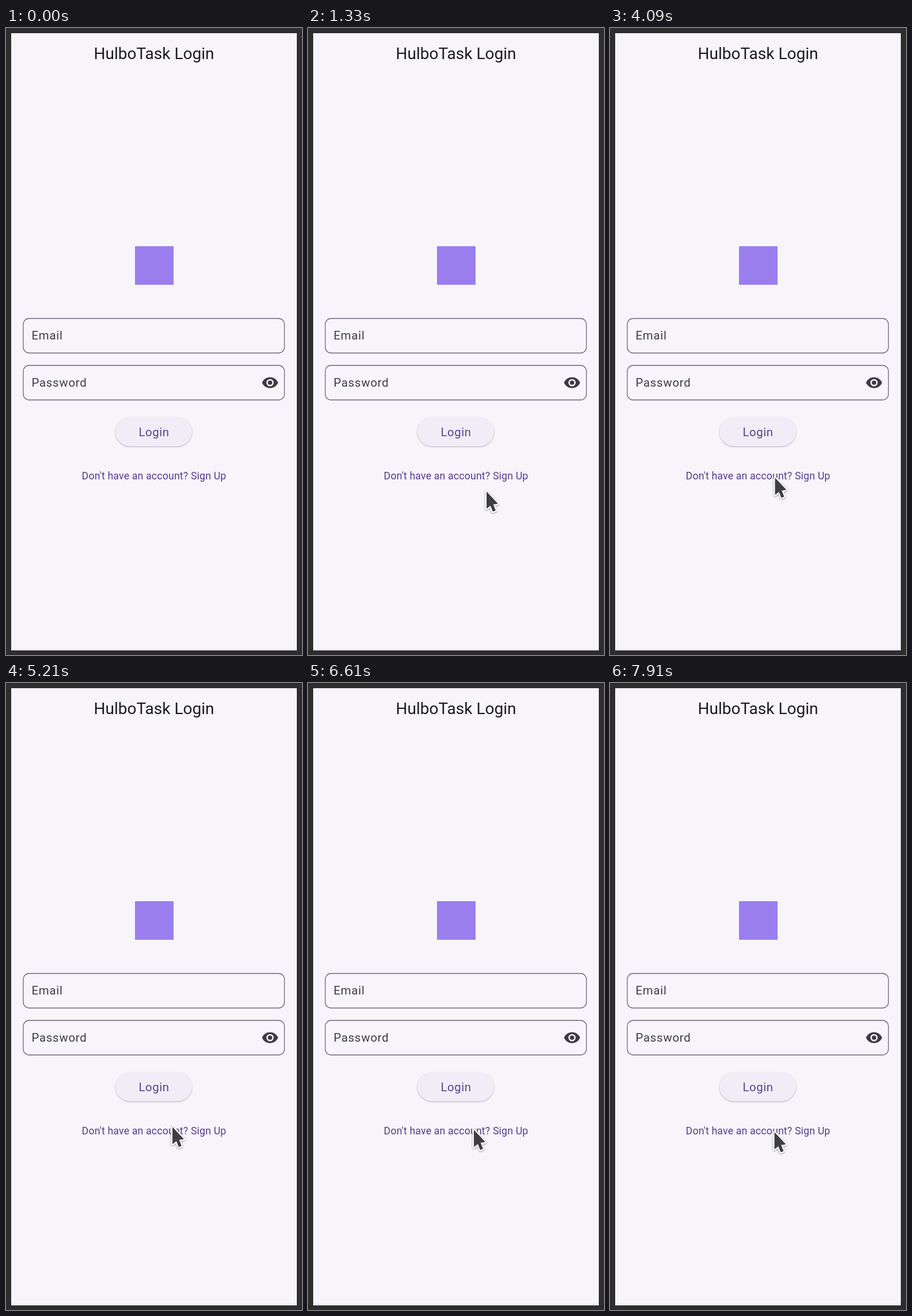
An HTML page that plays this animation: 514 px wide and 1089 px high, repeating every 8 s.

```html
<!DOCTYPE html>
<html lang="en">
<head>
<meta charset="utf-8">
<title>Login</title>
<style>
  html, body { margin: 0; width: 100%; height: 100%; overflow: hidden; background: #2d2d2e; }
  svg { display: block; width: 514px; height: 1089px; }
  text { font-family: Roboto, sans-serif; }
  .title { font-size: 28px; fill: #1d1b20; }
  .label { font-size: 20.4px; letter-spacing: .75px; fill: #403c46; }
  .action { font-size: 20.3px; letter-spacing: .6px; fill: #56438e; }
  .link { font-size: 17.8px; letter-spacing: .13px; fill: #543f8d; }
  .mid { text-anchor: middle; }
  .field { fill: none; stroke: #6c6777; stroke-width: 1.3; }
  .button { fill: #f1edf6; filter: drop-shadow(0 1px 1px rgba(40, 30, 60, .32)); }
  #cursor { filter: drop-shadow(0 1px 1.5px rgba(0, 0, 0, .4)); }
</style>
</head>
<body>
<svg viewBox="0 0 514 1089">
  <rect width="514" height="1089" fill="#2d2d2e"/>
  <rect x="9" y="9" width="496" height="1072" fill="#f7f4fa"/>
  <text class="title mid" x="257" y="54">HulboTask Login</text>
  <rect x="224" y="379" width="67" height="67" fill="#9b7eee"/>

  <rect class="field" x="30" y="504.5" width="453.5" height="60" rx="10"/>
  <text class="label" x="44.5" y="541">Email</text>
  <rect class="field" x="30" y="586" width="453.5" height="60" rx="10"/>
  <text class="label" x="44.5" y="622.5">Password</text>
  <g transform="translate(458.5 616) scale(1.27)">
    <path d="M-11 0C-9.27 -4.39 -5 -7.5 0 -7.5S9.27 -4.39 11 0C9.27 4.39 5 7.5 0 7.5S-9.27 4.39 -11 0Z" fill="#3f3b45"/>
    <circle r="4" fill="none" stroke="#f7f4fa" stroke-width="2"/>
  </g>

  <rect class="button" x="190" y="676" width="133" height="50.5" rx="25.25"/>
  <text class="action mid" x="257" y="709">Login</text>
  <text class="link mid" x="257" y="783.5">Don't have an account? Sign Up</text>

  <path id="cursor" d="M0 0V30L6.8 24.8L11 35L16 33L11.7 22.5L20 21.3Z"
        fill="#3f3f42" stroke="#fff" stroke-width="4.4" stroke-linejoin="round" paint-order="stroke"/>
</svg>
<script>
  const LOOP = 8000;
  const cursor = document.getElementById('cursor');

  // Cursor path: time in ms, x and y of the tip
  const path = [
    [450, 512, 842], [870, 390, 811], [1290, 310, 805], [1430, 310, 805],
    [1710, 296, 788], [2050, 286.5, 781], [4230, 286.5, 781],
    [4900, 289, 771], [5300, 289, 771], [6400, 288, 776],
    [6800, 288, 776], [7500, 285.5, 780], [LOOP, 285.5, 780]
  ];

  // The picture updates in bursts of three: 20, 20, then a 100 ms hold
  function stepTime(t) {
    const phase = (t + 110) % 140;
    return t - phase + Math.min(Math.floor(phase / 20), 2) * 20;
  }

  function tipAt(t) {
    const i = path.findIndex(p => p[0] > t);
    if (i < 1) return null;
    const [t0, x0, y0] = path[i - 1], [t1, x1, y1] = path[i];
    const k = (t - t0) / (t1 - t0), ease = k * k * (3 - 2 * k);
    return [x0 + (x1 - x0) * ease, y0 + (y1 - y0) * ease];
  }

  function draw(now) {
    const tip = tipAt(stepTime(now % LOOP));
    cursor.style.display = tip ? '' : 'none';
    if (tip) cursor.setAttribute('transform', `translate(${tip[0]} ${tip[1]})`);
    requestAnimationFrame(draw);
  }
  draw(performance.now());
</script>
</body>
</html>
```
